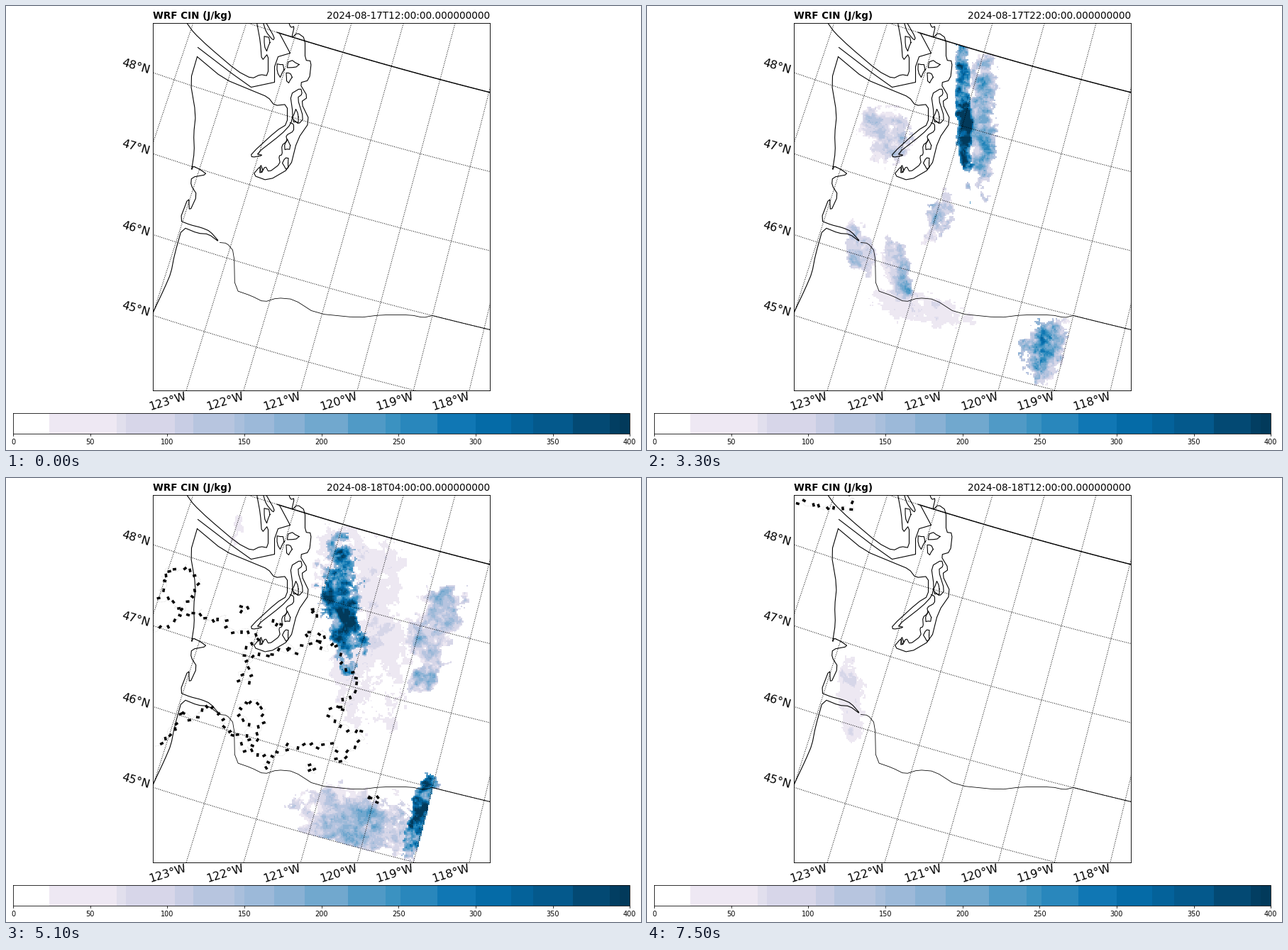
Animation of 895x626 px, one loop 7800 ms. Source, as a matplotlib script:

```python
import numpy as np
import matplotlib.pyplot as plt
from matplotlib.animation import FuncAnimation
from matplotlib.collections import LineCollection
from matplotlib.colors import BoundaryNorm, ListedColormap

W, H, DPI = 895, 626, 64
PX = 72 / DPI                       # points per pixel
X0, X1, Y0, Y1 = 207, 682, 23.9, 541.9
CELL = 1.9

plt.rcParams["font.family"] = "DejaVu Sans"
fig = plt.figure(figsize=(W / DPI, H / DPI), dpi=DPI, facecolor="white")
page = fig.add_axes([0, 0, 1, 1], xlim=(0, W), ylim=(H, 0))
page.axis("off")
chart = fig.add_axes([X0 / W, 1 - Y1 / H, (X1 - X0) / W, (Y1 - Y0) / H])
chart.set(xticks=[], yticks=[])
for side in chart.spines.values():
    side.set_linewidth(0.9 * PX)
    side.set_zorder(9)

# ---- conic projection in pixel units
APEX_X, APEX_Y, RHO46, STEP, CONE = 2068.4, -5365.2, 5984, 108.3, 0.72


def project(lat, lon):
    rho = RHO46 - STEP * (lat - 46)
    th = np.radians(-14.2 + CONE * (lon + 119))
    return APEX_X + rho * np.sin(th), APEX_Y + rho * np.cos(th)


def unproject(x, y):
    dx, dy = x - APEX_X, y - APEX_Y
    lat = 46 - (np.hypot(dx, dy) - RHO46) / STEP
    lon = -119 + (np.degrees(np.arctan2(dx, dy)) + 14.2) / CONE
    return lat, lon


# ---- colour scale
BAR = (10, 879.2, 573.9, 602.9)
EDGES = np.array([10, 61, 156, 169, 238, 264, 322, 336, 378, 421, 482, 535,
                  556, 608, 662, 712, 743, 799, 851, 865, 879.5])
levels = (EDGES - 10) / 869.5 * 400
colors = plt.get_cmap("PuBu")((levels[:-1] + levels[1:]) / 800)
colors[0] = 1
cmap = ListedColormap(colors)
norm = BoundaryNorm(levels, cmap.N)

left, right, top, bottom = BAR
for a, b, c in zip(EDGES, EDGES[1:], colors):
    page.fill_between([a, b], top, bottom, color=c, lw=0)
page.plot([left, right, right, left, left], [top, top, bottom, bottom, top],
          color="k", lw=0.8 * PX)
for v in range(0, 401, 50):
    x = left + v / 400 * (right - left)
    page.plot([x, x], [bottom, bottom + 3.4], color="k", lw=0.8 * PX)
    page.text(x, 614.5, str(v), size=9.7 * PX, ha="center", va="center")

# ---- titles and graticule
page.text(X0, 18, "WRF CIN (J/kg)", size=13.5 * PX, weight="bold")
stamp = page.text(X1, 18, "", size=13.6 * PX, ha="right")


def line(x, y, lw, style="-"):
    chart.plot(np.add(x, 0.5), np.add(y, 0.5), color="k", lw=lw * PX,
               ls=style, zorder=5)


def degree(x, y, text, turn):
    page.text(x, y, text, size=16 * PX, rotation=turn, ha="center", va="center")


span = np.linspace(-127, -116, 80)
for lat in range(45, 50):
    x, y = project(lat, span)
    line(x, y, 1, ":")
    if lat < 49:
        degree(182.8, np.interp(X0, x, y) - 8, f"{lat}°N", -16.5)
rows = np.linspace(51, 43, 40)
for lon in range(-126, -116):
    x, y = project(rows, lon)
    line(x, y, 1, ":")
    if -123 <= lon <= -118:
        degree(np.interp(Y1, y, x) - 25.8, 558, f"{-lon}°W", 17)

# ---- coast and borders: key points with rounded corners
OCEAN = [(269, 71), (259, 105), (267, 152), (264, 180), (265, 205),
         (261, 231), (263, 225), (273, 230), (283, 237), (261, 241),
         (260, 252), (269, 266), (258, 290), (257, 268), (244, 302),
         (259, 308), (275, 312), (287, 317), (301, 333), (285, 321),
         (270, 320), (248, 311), (237, 350), (232, 376), (223, 397),
         (207, 431)]
STRAIT = [(269, 71), (306, 102), (347, 119), (369, 128), (378, 140),
          (396, 138), (396, 166), (381, 175), (345, 208), (346, 213),
          (362, 210), (352, 208), (388, 180), (401, 166), (404, 152),
          (400, 124), (415, 115), (417, 124), (410, 129), (419, 158),
          (412, 166), (405, 160)]
SOUND = [(398, 23), (401, 30), (406, 28), (402, 45), (410, 37), (421, 45),
         (421, 76), (430, 77), (427, 104), (413, 108), (425, 128),
         (415, 135), (428, 162), (410, 188), (400, 228), (369, 246),
         (347, 238), (358, 225), (359, 236), (365, 225), (370, 234),
         (386, 222), (384, 211), (389, 209), (388, 196), (396, 190),
         (394, 182), (405, 176), (405, 166), (400, 164)]
ISLAND = [(254, 23), (264, 37), (285, 57), (325, 91), (346, 102),
          (358, 96), (369, 98), (369, 66), (360, 77), (358, 50), (353, 23)]
INLET = [(362, 23), (366, 36), (376, 48), (378, 44), (366, 23)]
MARITIME = [(270, 58), (317, 94), (345, 114), (378, 107), (378, 85),
            (383, 71), (400, 66), (385, 38)]
RIVER = [(301, 333), (311, 334), (321, 346), (322, 400), (345, 408),
         (363, 417), (382, 411), (405, 413), (436, 433), (496, 439),
         (528, 435), (570, 435), (588, 439), (600, 436)]
ISLETS = [(386, 89, 5, 9), (403, 82, 8, 5), (398, 100, 4, 7), (396, 196, 4, 7),
          (394, 221, 4, 8), (359, 230, 2, 5), (408, 156, 4, 9), (367, 51, 4, 10)]


def rounded(points, cut=0.2):
    p = np.array(points, float)
    a, b = p[:-1], p[1:]
    mid = np.stack([a + cut * (b - a), b - cut * (b - a)], 1).reshape(-1, 2)
    return np.vstack([p[:1], mid, p[-1:]])


for path in (OCEAN, STRAIT, SOUND, ISLAND, INLET):
    line(*rounded(path).T, 1.1)
line(*np.transpose(MARITIME), 1.1)
line(*rounded(RIVER).T, 0.8)
turn = np.linspace(0, 2 * np.pi, 9)
for x, y, rx, ry in ISLETS:
    r = 1 + 0.25 * np.sin(3 * turn + x)
    line(x + rx * r * np.cos(turn), y + ry * r * np.sin(turn), 1.1)
line(*project(46, np.linspace(-119, -117, 20)), 0.9)
line(*project(49, np.linspace(-123.36, -117, 40)), 1.4)

# ---- shaded field: cells (x, y, rx, ry, tilt, value) that swell and fade
gx, gy = np.meshgrid(np.arange(X0, X1, CELL), np.arange(Y0, Y1, CELL))
lat, lon = unproject(gx, gy)
inside = (lat > 45) & (lat < 49) & ((lat > 46) | (lon < -119))


def noise(seed, power, cut):
    spec = np.fft.fft2(np.random.default_rng(seed).normal(size=gx.shape))
    fy = np.fft.fftfreq(gx.shape[0])[:, None]
    fx = np.fft.fftfreq(gx.shape[1])[None]
    out = np.fft.ifft2(spec / (np.hypot(fx, fy) + cut) ** power).real
    return (out - out.mean()) / out.std()


edge, tone = noise(4, 1.9, 0.03), noise(9, 2.1, 0.03)
wave = noise(21, 4, 0.05)

# peak hour: (spread in hours, cells)
CELLS = {
    18: (2, [(463, 265, 14, 5, 33, 150), (488, 211, 14, 4, 10, 110)]),
    22: (1.9, [(446, 150, 10, 100, -2, 340), (472, 160, 22, 80, 0, 170),
               (410, 295, 20, 48, 20, 150), (335, 175, 30, 42, 0, 110),
               (300, 340, 16, 42, -12, 130), (355, 375, 20, 38, -12, 140),
               (375, 425, 70, 22, 10, 62), (558, 485, 32, 42, 0, 200)]),
    26: (1.3, [(456, 108, 19, 54, 8, 400), (492, 115, 36, 50, 0, 170),
               (327, 75, 11, 46, 12, 190), (328, 175, 44, 42, 0, 75),
               (462, 215, 26, 75, 0, 125), (400, 270, 45, 80, 0, 52),
               (535, 350, 82, 112, -14, 135), (520, 475, 74, 62, 14, 190)]),
    28: (1.3, [(476, 175, 28, 82, -8, 290), (515, 200, 56, 130, 0, 62),
               (603, 200, 46, 54, 0, 130), (585, 285, 24, 18, -30, 190),
               (582, 487, 17, 58, 13, 390), (495, 480, 85, 42, 14, 125)]),
    32: (1.9, [(585, 315, 36, 64, 22, 62), (640, 121, 10, 10, 0, 220)]),
    36: (1.5, [(288, 305, 17, 58, -5, 54)]),
}


def footprint(x, y, rx, ry, tilt, value):
    c, s = np.cos(np.radians(tilt)), np.sin(np.radians(tilt))
    u, v = gx - x, gy - y
    r2 = ((u * c + v * s) / rx) ** 2 + ((v * c - u * s) / ry) ** 2
    body = 1 - r2 + 0.45 * edge
    depth = np.clip(0.5 + 0.6 * body, 0, 1.1) * (1 + 0.25 * tone)
    return np.where(inside & (body > 0), value * depth, 0)


LAYERS = [(peak, spread, np.max([footprint(*c) for c in cells], axis=0))
          for peak, (spread, cells) in CELLS.items()]


def shade(hour):
    parts = [f * np.exp(-((hour - peak) / spread) ** 2)
             for peak, spread, f in LAYERS]
    return np.clip(np.max(parts, axis=0), 0, 399)


# ---- a band with a wavy rim, dotted by black marks, that travels north
BAND_HOURS = [22, 26, 28, 32, 36]
BAND = {"north": [600, 295, 190, 85, 20], "south": [700, 470, 330, 150, 42],
        "east": [440, 440, 495, 760, 285], "slope": [.3, .3, .3, .03, -.02],
        "sway": [24, 24, 28, 22, 5]}


def rim(hour):
    b = {k: np.interp(hour, BAND_HOURS, v) for k, v in BAND.items()}
    y = gy - b["slope"] * (gx - X0)
    depth = np.minimum(np.minimum(y - b["north"], b["south"] - y),
                       b["east"] - gx) + b["sway"] * wave
    if hour <= 22 or depth.max() <= 0:
        return []
    lines = chart.contour(gx, gy, depth, levels=[0])
    paths = lines.allsegs[0]
    lines.remove()
    return [p for p in paths if len(p) > 8]


def marks(hour):
    rng = np.random.default_rng(hour)
    ticks, threads = [], []
    for p in rim(hour):
        run = np.r_[0, np.cumsum(np.hypot(*np.diff(p, axis=0).T))]

        def along(d):
            return np.c_[np.interp(d, run, p[:, 0]), np.interp(d, run, p[:, 1])]

        q = along(np.arange(0, run[-1], 11))
        q += rng.normal(0, 1.6, q.shape)
        ang = rng.uniform(0, np.pi, len(q))
        arm = 2.5 * np.c_[np.cos(ang), np.sin(ang)]
        ticks += list(np.stack([q - arm, q + arm], axis=1))
        d = np.arange(0, run[-1], 2)
        threads.append(along(d) + 4 * np.c_[np.sin(d * .42), np.cos(d * .3)])
    return ticks, threads


shading = chart.imshow(shade(12), cmap=cmap, norm=norm, aspect="auto",
                       interpolation="nearest", zorder=1,
                       extent=(X0, X0 + CELL * gx.shape[1],
                               Y0 + CELL * gx.shape[0], Y0))
threads = chart.add_collection(LineCollection(
    [], colors="#b4b4b4", linewidths=0.5 * PX, linestyles=":", zorder=6))
ticks = chart.add_collection(LineCollection(
    [], colors="k", linewidths=3.5 * PX, capstyle="butt", zorder=7))


def draw(i):
    hour = 12 + max(0, i - 1)
    stamp.set_text(f"2024-08-{17 + hour // 24}T{hour % 24:02d}:00:00.000000000")
    shading.set_data(shade(hour))
    bits, lines = marks(hour)
    ticks.set_segments(bits)
    threads.set_segments(lines)
    chart.set(xlim=(X0, X1), ylim=(Y1, Y0))
    return stamp, shading, ticks, threads


anim = FuncAnimation(fig, draw, frames=26, interval=300, repeat=True,
                     init_func=lambda: draw(0))
plt.show()
```
